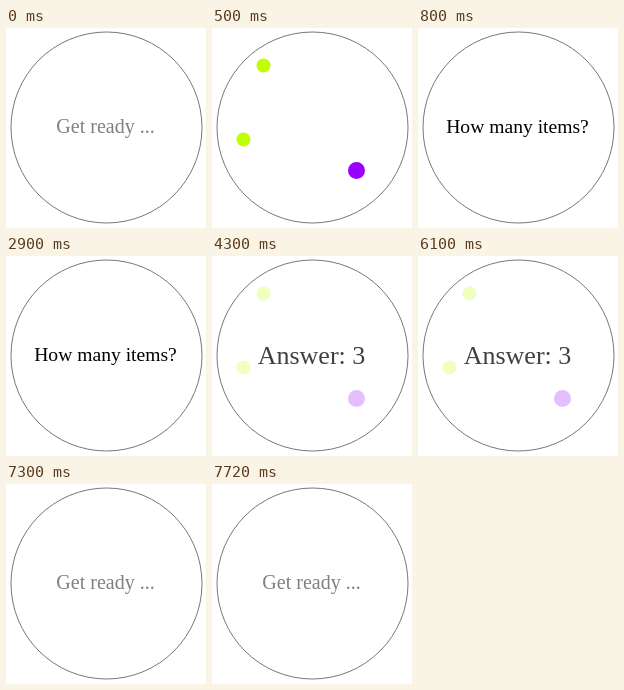
These frames come from a looping animation (200x200 px, 8000 ms). An HTML page:

```html
<!DOCTYPE html>
<html lang="en">
<head>
<meta charset="utf-8">
<title>How many items?</title>
<style>
  html, body { margin: 0; width: 100%; height: 100%; overflow: hidden; background: #fff; }
  svg { display: block; width: 200px; height: 200px; }
  text { font-family: "Liberation Serif", "Times New Roman", serif; font-kerning: none; text-anchor: middle; }
</style>
</head>
<body>
<svg viewBox="0 0 200 200">
  <circle cx="100.5" cy="99.5" r="95.5" fill="none" stroke="#777"/>
  <g id="dots">
    <circle cx="51.5" cy="37.5" r="7" fill="#bfff00"/>
    <circle cx="31.5" cy="111.5" r="7" fill="#bfff00"/>
    <circle cx="144.5" cy="142.5" r="8.5" fill="#9900ff"/>
  </g>
  <text id="label"/>
</svg>
<script>
const LOOP = 8000;
const dots = document.getElementById("dots");
const label = document.getElementById("label");

const ready = { text: "Get ready ...", size: 20, x: 99.5, y: 105, color: "#808080", dots: 0 };
const scenes = [
  { ...ready, until: 500 },
  { until: 800, text: "", size: 20, x: 100, y: 105, color: "#000", dots: 1 },
  { until: 4300, text: "How many items?", size: 19.6, x: 99.5, y: 105, color: "#000", dots: 0 },
  { until: 7300, text: "Answer: 3", size: 26, x: 99.5, y: 108, color: "#404040", dots: 0.25 },
  { ...ready, until: LOOP },
];

let shown;

function draw(time) {
  const scene = scenes.find(s => time < s.until);
  if (scene === shown) return;
  shown = scene;
  dots.setAttribute("opacity", scene.dots);
  label.textContent = scene.text;
  label.setAttribute("x", scene.x);
  label.setAttribute("y", scene.y);
  label.setAttribute("font-size", scene.size);
  label.setAttribute("fill", scene.color);
}

const start = performance.now();
function tick() {
  draw((performance.now() - start) % LOOP);
  requestAnimationFrame(tick);
}
tick();
</script>
</body>
</html>
```
